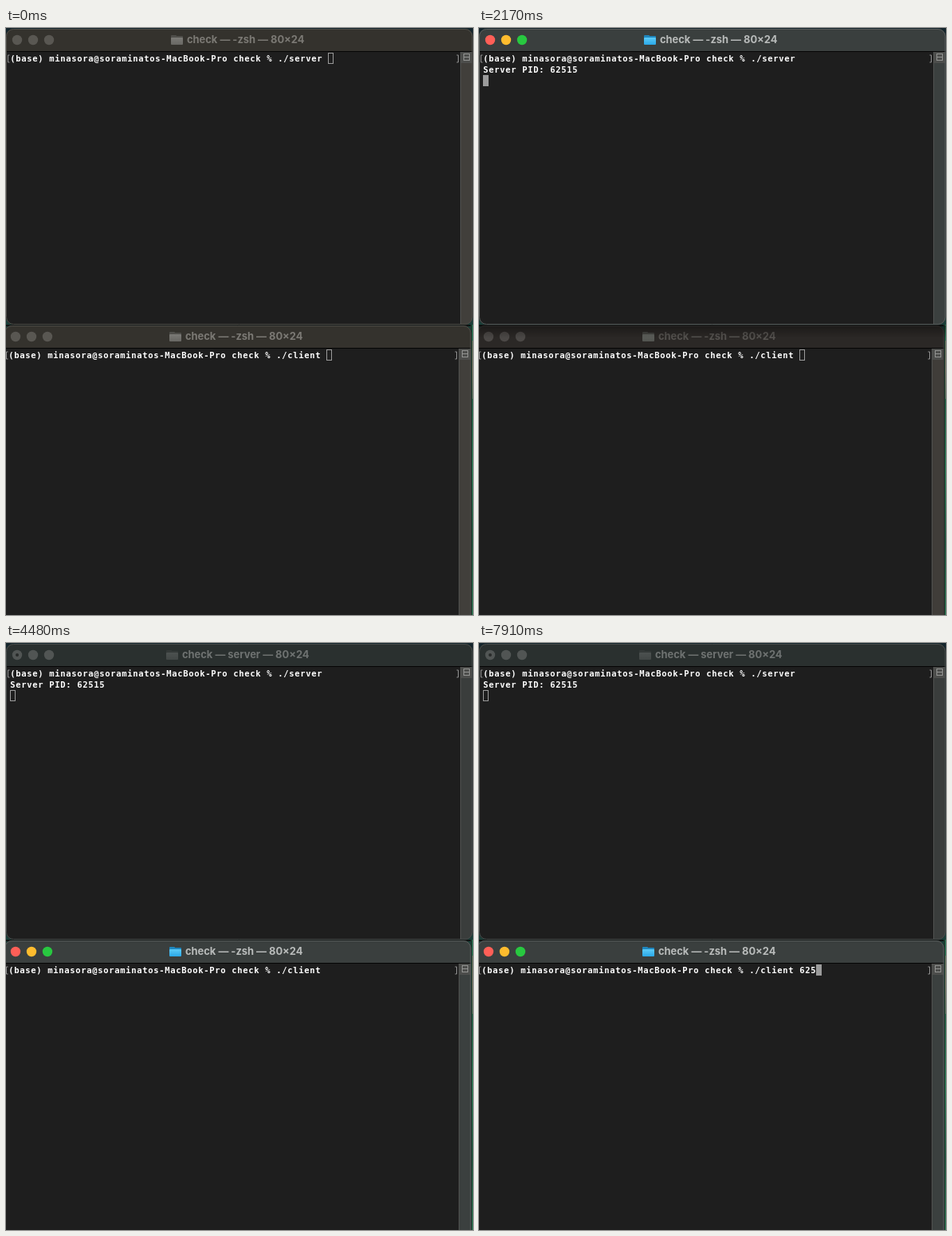
An HTML page with a canvas that plays this animation: 586x736 px, repeating every 8000 ms.

```html
<!DOCTYPE html>
<html lang="en">
<head>
<meta charset="utf-8">
<title>Two terminals</title>
<style>
html, body { margin: 0; width: 100%; height: 100%; overflow: hidden; background: #111; }
canvas { display: block; }
</style>
</head>
<body>
<canvas id="stage" width="586" height="736"></canvas>
<script>
const c = document.getElementById('stage').getContext('2d');
const LOOP = 8000, CELL = 7, ROW = 14;
const PROMPT = '(base) minasora@soraminatos-MacBook-Pro check % ';
const HOLLOW = -1;

// Cursor opacity from each time on
const serverCursor = [[0, HOLLOW], [700, 1], [1190, .5], [1260, 0], [1400, .5], [1470, 1],
  [2100, .5], [2170, 1], [3010, .5], [3080, 1], [3500, HOLLOW]];
const clientCursor = [[0, HOLLOW], [3500, 1], [4410, .5], [4480, 0], [4620, .5], [4690, 1],
  [5320, .5], [5390, 0], [5530, .5], [5600, 1], [7140, 0], [7350, 1]];
const typed = [[0, ''], [7350, '6'], [7560, '62'], [7910, '625']];

const themes = {
  active: { bar: '#3a3f3e', text: '#b8bbba', scroll: '#3b403f', edge: '#585d5c',
    lights: ['#ff5f57', '#febc2e', '#28c840'], folder: ['#1f86bd', '#5ccbf8', '#2aa8e8'] },
  idle: { bar: '#34322d', text: '#7b7974', scroll: '#413f3b', edge: '#4e4d48',
    light: '#595752', folder: ['#4f4e4a', '#7b7a76', '#686763'] },
  warm: { bar: '#2b2826', text: '#55524f', scroll: '#403d39', edge: '#3c3937',
    light: '#4b4846', folder: ['#434340', '#5f615d', '#525450'] },
  cool: { bar: '#2a302f', text: '#6e7271', scroll: '#3a3d3c', edge: '#474c4b',
    light: '#515554', folder: ['#343938', '#4c5150', '#424746'] }
};
const busyFolder = ['#2a566b', '#44809a', '#356f8a'];

const at = (steps, t) => steps.filter(s => s[0] <= t).pop()[1];

function box(x, y, w, h, color) {
  c.fillStyle = color;
  c.fillRect(x, y, w, h);
}

function frame(x, y, w, h, color) {
  c.strokeStyle = color;
  c.lineWidth = 1;
  c.strokeRect(x + .5, y + .5, w - 1, h - 1);
}

function disc(x, y, r, color) {
  c.fillStyle = color;
  c.beginPath();
  c.arc(x, y, r, 0, 7);
  c.fill();
}

function fade(y0, y1, ...colors) {
  const g = c.createLinearGradient(0, y0, 0, y1);
  colors.forEach((k, i) => g.addColorStop(i / (colors.length - 1), k));
  return g;
}

function folder(x, y, [back, top, low]) {
  c.fillStyle = back;
  c.beginPath();
  c.roundRect(x, y, 7, 5, 1);
  c.roundRect(x, y + 1, 15, 8, 1);
  c.fill();
  c.fillStyle = fade(y + 3, y + 12, top, low);
  c.beginPath();
  c.roundRect(x, y + 3, 15, 9, 1);
  c.fill();
}

function bracket(x, y, dir) {
  c.strokeStyle = '#929292';
  c.lineWidth = 1;
  c.beginPath();
  c.moveTo(x + 2 * dir, y - 4.5);
  c.lineTo(x, y - 4.5);
  c.lineTo(x, y + 4.5);
  c.lineTo(x + 2 * dir, y + 4.5);
  c.stroke();
}

// One character per cell, as a terminal sets it
function cells(text, x, y) {
  c.font = '700 10.5px "DejaVu Sans Mono", monospace';
  c.fillStyle = '#fff';
  c.textAlign = 'center';
  [...text].forEach((ch, i) => c.fillText(ch, x + CELL * (i + .5), y));
  c.textAlign = 'left';
}

function cursor(x, y, alpha) {
  if (alpha === HOLLOW) return frame(x, y, CELL, ROW, '#9b9b9b');
  c.globalAlpha = alpha;
  box(x, y, CELL, ROW, '#9b9b9b');
  c.globalAlpha = 1;
}

function terminal(x, y, h, theme, name, busy, lines, cursorState) {
  c.save();
  c.beginPath();
  c.roundRect(x, y, 585.5, h, 9);
  c.clip();
  box(x, y, 586, h, '#1e1e1e');
  box(x, y, 586, 28, theme.bar);
  box(x, y + 28, 586, 1, '#050505');

  // Scroll track with split button
  const sx = x + 570;
  box(sx, y + 29, 16, h, theme.scroll);
  box(sx, y + 29, 1, h, '#50514f');
  box(sx + 1, y + 29, 14, 14, '#4d4e4c');
  frame(sx + 4, y + 31, 8, 9, '#939492');
  box(sx + 5, y + 35, 6, 1, '#939492');

  for (let i = 0; i < 3; i++)
    disc(x + 14 + 20 * i, y + 14, 6.2, theme.lights ? theme.lights[i] : theme.light);
  if (busy) disc(x + 14, y + 14, 2, theme.lights ? '#8e1a12' : '#272a29');

  const tx = x + (busy ? 221 : 227);
  folder(tx - 20, y + 8, busy && theme.lights ? busyFolder : theme.folder);
  c.font = '700 12.9px Inter, "Liberation Sans", sans-serif';
  c.fillStyle = theme.text;
  c.fillText(`check — ${name} — 80×24`, tx, y + 18);

  lines.forEach((s, i) => cells(s, x + 5, y + 41 + ROW * i));
  bracket(x + 2.5, y + 37.5, 1);
  bracket(x + 567.5, y + 37.5, -1);
  const last = lines.length - 1;
  cursor(x + 5 + CELL * lines[last].length, y + 30 + ROW * last, cursorState);
  c.restore();

  c.strokeStyle = theme.edge;
  c.lineWidth = 1;
  c.beginPath();
  c.roundRect(x + .5, y + .5, 584.5, h - 1, 9);
  c.stroke();
}

function wallpaper() {
  box(0, 0, 586, 736, fade(0, 736, '#14252c', '#173335', '#1c4a3c', '#1c4a38'));
  box(583, 372, 2, 364, '#1b3a2e');
  box(585, 372, 1, 20, '#2f7d58');
  box(585, 392, 1, 73, fade(392, 465, '#6f7b62', '#857f6c', '#5f7760'));
  box(585, 465, 1, 271, fade(465, 736, '#276a4b', '#348a5e', '#245d43', '#34835a'));
  box(0, 372, 583, 2, '#101413');
}

function draw(now) {
  const t = now % LOOP;
  const ran = t >= 2170, busy = t >= 2240;
  const first = t < 630, client = t >= 3430;
  wallpaper();
  terminal(-2, 373, 380, client ? themes.active : first ? themes.idle : themes.warm,
    '-zsh', false, [PROMPT + './client ' + at(typed, t)], at(clientCursor, t));
  if (!first && !client) {
    // Shadow of the window above
    box(0, 373, 586, 16, fade(373, 389, 'rgba(0,0,0,.36)', 'rgba(0,0,0,0)'));
  }
  terminal(0, 1, 371, client ? themes.cool : first ? themes.idle : themes.active,
    busy ? 'server' : '-zsh', busy,
    ran ? [PROMPT + './server', 'Server PID: 62515', ''] : [PROMPT + './server '],
    at(serverCursor, t));
}

let start;
function tick(now) {
  start ??= now;
  draw(now - start);
  requestAnimationFrame(tick);
}
requestAnimationFrame(tick);
</script>
</body>
</html>
```
